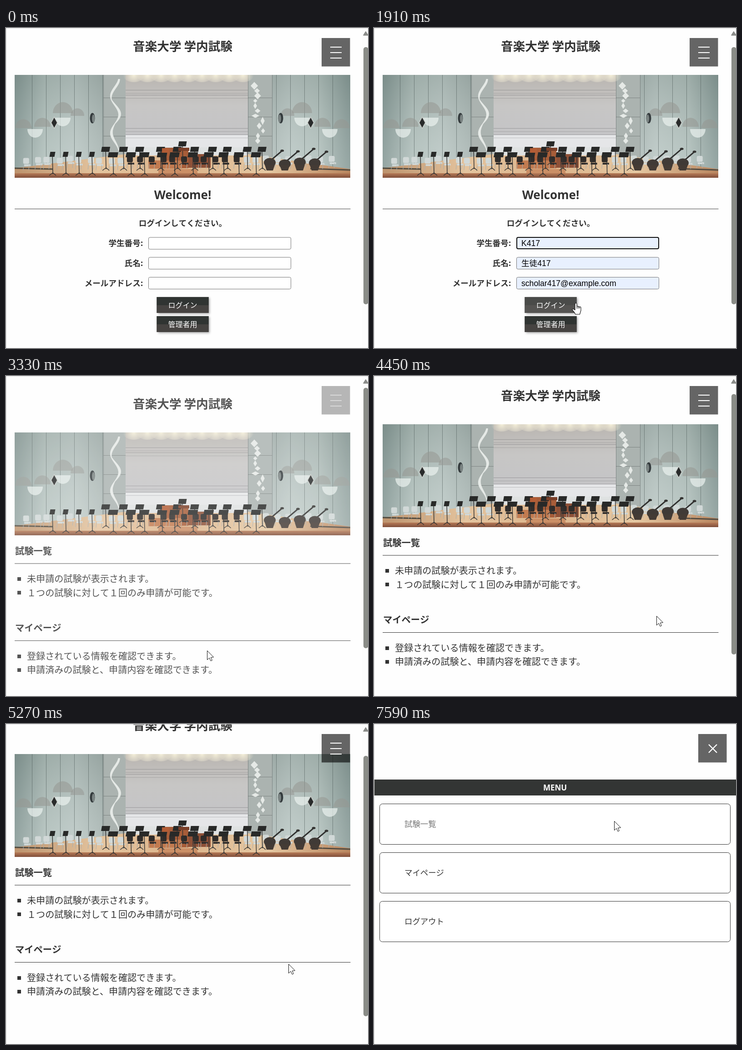
These frames come from a looping animation (796 px wide and 703 px high, 8000 ms). An HTML page with a canvas:

```html
<!DOCTYPE html>
<html lang="ja">
<head>
<meta charset="utf-8">
<title>音楽大学 学内試験</title>
<style>
html, body { margin: 0; width: 100%; height: 100%; overflow: hidden; background: #fefefe; }
canvas { display: block; }
</style>
</head>
<body>
<canvas id="stage" width="796" height="703"></canvas>
<script>
const W = 796, H = 703, LOOP = 8000, INK = '#333', PAPER = '#fefefe';
const CJK = '"Noto Sans CJK JP", "Noto Sans CJK", sans-serif';
const LATIN = '"Noto Sans", sans-serif';
const FIELD = '"Liberation Sans", "Noto Sans CJK JP", "Noto Sans CJK", sans-serif';
const stage = document.getElementById('stage').getContext('2d');
let g = stage;

// ---------- drawing helpers ----------
function rect(x, y, w, h, color) {
  g.fillStyle = color;
  g.fillRect(x, y, w, h);
}

function box(x, y, w, h, r, fill, stroke, line = 1) {
  g.beginPath();
  g.roundRect(x, y, w, h, r);
  if (fill) { g.fillStyle = fill; g.fill(); }
  if (stroke) { g.strokeStyle = stroke; g.lineWidth = line; g.stroke(); }
}

function poly(points, fill, stroke, line = 1) {
  g.beginPath();
  points.forEach(([x, y]) => g.lineTo(x, y));
  g.closePath();
  if (fill) { g.fillStyle = fill; g.fill(); }
  if (stroke) { g.strokeStyle = stroke; g.lineWidth = line; g.lineJoin = 'round'; g.stroke(); }
}

function strokeLine(x1, y1, x2, y2, color, width = 1) {
  g.beginPath();
  g.moveTo(x1, y1);
  g.lineTo(x2, y2);
  g.strokeStyle = color;
  g.lineWidth = width;
  g.stroke();
}

function ellipse(x, y, rx, ry, color, from = 0, to = Math.PI * 2) {
  g.beginPath();
  g.ellipse(x, y, rx, ry, 0, from, to);
  g.fillStyle = color;
  g.fill();
}

function diamond(x, y, rx, ry, fill) {
  poly([[x, y - ry], [x + rx, y], [x, y + ry], [x - rx, y]], fill);
}

// cy is the optical middle of the line
function text(str, x, cy, size, { weight = 400, color = INK, align = 'left', family = CJK } = {}) {
  g.font = `${weight} ${size}px ${family}`;
  g.textAlign = align;
  g.fillStyle = color;
  g.fillText(str, x, cy + size * 0.37);
}

function gradient(x1, y1, x2, y2, ...colors) {
  const fill = g.createLinearGradient(x1, y1, x2, y2);
  colors.forEach((c, i) => fill.addColorStop(i / (colors.length - 1), c));
  return fill;
}

// ---------- timing helpers ----------
const within = (t, start, end) => t >= start && t < end;
const smooth = k => k * k * (3 - 2 * k);

// 0 to 1 in evenly timed steps
function stepped(t, start, end, steps) {
  const k = Math.floor((t - start) / (end - start) * steps + 1e-6) / steps;
  return Math.min(1, Math.max(0, k));
}

function seeded(seed) {
  return () => (seed = seed * 16807 % 2147483647) / 2147483647;
}

// ---------- concert hall ----------
function makePhoto() {
  const canvas = document.createElement('canvas');
  canvas.width = 738;
  canvas.height = 226;
  g = canvas.getContext('2d');
  const random = seeded(29);
  drawWall(171);
  g.save();
  g.translate(738, 0);
  g.scale(-1, 1);
  drawWall(153);
  g.restore();
  drawScreen();
  drawOrnaments(random);
  drawFloor();
  drawOrchestra(random);
  g = stage;
  return canvas;
}

function drawFan(x, y, r) {
  ellipse(x, y, r, r * 1.1, 'rgba(150,152,147,.55)', Math.PI, Math.PI * 2);
}

function drawGlow(x, y) {
  ellipse(x, y, 17, 19, 'rgba(235,242,240,.7)', 0, Math.PI);
}

function drawWall(windowX) {
  rect(0, 0, 200, 226, gradient(0, 0, 200, 0, '#879a97', '#b3c2be', '#bdcac7', '#a9b6b3'));
  rect(0, 0, 200, 226, gradient(0, 0, 0, 226, 'rgba(70,85,80,.2)', 'rgba(255,255,255,.12)'));
  for (let x = 38; x < 195; x += 31) strokeLine(x + .5, 0, x + .5, 205, 'rgba(70,82,80,.55)');
  drawFan(19, 117, 18);
  drawFan(61, 114, 18);
  drawFan(106, 84, 22);
  drawFan(138, 90, 15);
  drawGlow(45, 119);
  drawGlow(106, 94);
  diamond(87, 105, 8, 14, '#c9cdc9');
  diamond(87, 105, 6, 11, '#292b2b');
  ellipse(windowX, 95, 5.5, 11.5, '#343b3d');
  ellipse(windowX + 2, 96, 3, 9, '#7b8483');
}

function drawScreen() {
  const seam = 'rgba(85,90,90,.5)';
  for (const [x, w] of [[195, 49], [513, 53]]) {
    rect(x, 0, w, 226, '#abb3b0');
    for (let y = 50; y < 150; y += 42) strokeLine(x, y + .5, x + w, y + .5, seam);
    strokeLine(x + .5, 0, x + .5, 180, seam);
    strokeLine(x + w + .5, 0, x + w + .5, 180, seam);
  }
  rect(244, 0, 269, 180, gradient(0, 0, 0, 135, '#b9b5b0', '#c7c6c5', '#c4c4c6'));
  rect(244, 132, 269, 30, '#e5e6e8');
  for (const top of [33, 44, 117, 131]) {
    strokeLine(244, top + .5, 513, top + .5, 'rgba(115,115,118,.5)');
    strokeLine(244, top + 7.5, 513, top + 7.5, 'rgba(115,115,118,.35)');
  }
  for (let x = 262; x < 510; x += 30) {
    const lamp = g.createRadialGradient(x, 0, 0, x, 0, 24);
    lamp.addColorStop(0, 'rgba(255,250,225,.85)');
    lamp.addColorStop(1, 'rgba(255,245,220,0)');
    ellipse(x, 0, 24, 16, lamp);
  }
}

function drawOrnaments(random) {
  const pale = '#e5e9e6';
  for (let y = 9; y < 168; y++) {
    const width = 2 + 4 * Math.abs(Math.sin(y / 17));
    rect(219 + 9 * Math.sin(y / 13 + 1.2), y, width, 1.5, pale);
  }
  for (let i = 0; i < 12; i++) {
    diamond(527 + random() * 20, 24 + i * 11, 4 + random() * 5, 4 + random() * 5, pale);
  }
}

function drawFloor() {
  poly([[0, 205], [244, 174], [513, 174], [738, 207], [738, 226], [0, 226]],
    gradient(0, 0, 738, 0, '#bd936d', '#e4c49e', '#dcb48b', '#e5c8a2', '#b9865f'));
  rect(244, 159, 269, 18, '#dfe2e2');
  rect(322, 160, 60, 45, '#a75d39');
  rect(382, 174, 49, 30, '#8e5138');
  rect(294, 188, 74, 18, '#c27b50');
  strokeLine(0, 205, 84, 207, '#514b40', 3);
  strokeLine(650, 206, 738, 209, '#544d43', 3);
  rect(0, 216, 738, 10, gradient(0, 216, 0, 226, '#b67b57', '#7f4e3a'));
  rect(316, 207, 86, 9, '#cb8f66');
}

function drawChair(x, y, color) {
  box(x, y, 13, 13, 3, color);
  rect(x + 2, y + 14, 14, 4, color);
  strokeLine(x + 1, y + 16, x, y + 27, '#a9aeae');
  strokeLine(x + 13, y + 16, x + 12, y + 27, '#a9aeae');
}

function drawStand(x, y, w) {
  strokeLine(x, y, x + 1, y + 44, '#343433', 1.5);
  strokeLine(x - 7, y + 47, x + 1, y + 41, '#343433', 1.5);
  strokeLine(x + 8, y + 47, x + 1, y + 41, '#343433', 1.5);
  poly([[x - w / 2 + 2, y - 5], [x + w / 2, y - 5], [x + w / 2 - 2, y + 6], [x - w / 2, y + 6]], '#282928');
}

function drawCello(x, y, size) {
  const tipX = x + size, tipY = y - size * .85;
  strokeLine(x, y, tipX, tipY, '#30302f', 3);
  ellipse(tipX, tipY, 4, 2.5, '#343331');
  ellipse(x, y + 3, 13, 10, '#403a36');
  poly([[x - 11, 198], [x + 11, 198], [x + 7, 210], [x - 7, 210]], '#443b35');
}

function drawOrchestra(random) {
  const jitter = amount => (random() - .5) * amount;
  for (let x = 20; x < 690; x += 23) {
    if (x < 250 || x > 480) drawChair(x + jitter(8), 180 + jitter(6), '#d1d8d7');
    else drawChair(x + jitter(8), 179, '#302c2a');
  }
  drawStand(369, 151, 19);
  for (let i = 0; i < 10; i++) drawStand(202 + i * 38.3 + jitter(8), 163, 20);
  for (let i = 0; i < 10; i++) drawStand(216 + i * 35 + jitter(10), 175, 23);
  for (let i = 0; i < 4; i++) drawStand(83 + i * 29, 174, 13);
  rect(324, 161, 15, 10, '#b35d36');
  rect(360, 160, 24, 7, '#7a3f29');
  for (let i = 0; i < 4; i++) drawCello(561 + i * 33, 189 + jitter(8), 29 + jitter(8));
}

const photo = makePhoto();

// ---------- page parts ----------
function drawHeader(top) {
  text('音楽大学 学内試験', 388.5, top + 61, 26.6, { weight: 700, align: 'center' });
  g.drawImage(photo, 19, top + 124);
}

function drawMenuButton(x, open) {
  rect(x, 22, 62.5, 62.5, 'rgba(0,0,0,.6)');
  if (open) {
    strokeLine(x + 23, 45, x + 41, 63, '#fff', 2.4);
    strokeLine(x + 41, 45, x + 23, 63, '#fff', 2.4);
  } else {
    for (let y = 41; y <= 65; y += 12) rect(x + 19, y, 25, 2, '#fff');
  }
}

function drawScrollbar(scroll, length) {
  rect(783, 1, 13, H, '#fcfcfc');
  poly([[791, 8], [796, 16], [786, 16]], '#8a8c89', '#8a8c89', 1.5);
  box(786, 26 + scroll * .76, 10.5, length, 5, '#8a8c87');
}

function drawField(y, value, focused) {
  const fill = value ? '#e8f0fe' : '#fff';
  if (focused) box(314, y, 312, 25, 3, fill, '#101010', 2);
  else box(313.5, y, 313, 26, 3, fill, '#767676');
  text(value, 324, y + 12.5, 17.6, { color: '#000', family: FIELD });
}

function drawButton(y, label, hover) {
  g.save();
  g.shadowColor = 'rgba(0,0,0,.35)';
  g.shadowBlur = 5;
  g.shadowOffsetX = g.shadowOffsetY = 2;
  rect(331.5, y, 114, 35, INK);
  g.restore();
  rect(331.5, y, 114, 18, hover ? '#4a4b49' : '#303432');
  rect(331.5, y + 18, 114, 17, hover ? '#555452' : '#464341');
  text(label, 388.5, y + 18.5, 16, { weight: 500, color: '#fff', align: 'center' });
}

function drawLogin(t) {
  const bold = { weight: 700, align: 'center' };
  const filled = t >= 390;
  const focused = within(t, 390, 2010);
  const caretOn = Math.floor((t - 410) / 500) % 2 === 0;
  const rows = [['学生番号:', 'K417'], ['氏名:', '生徒417'], ['メールアドレス:', 'scholar417@example.com']];

  drawHeader(-21);
  text('Welcome!', 388.5, 366.5, 26, { ...bold, family: LATIN });
  rect(19, 397, 738.5, 1, '#444');
  text('ログインしてください。', 388.5, 428, 17.6, bold);
  rows.forEach(([label, value], i) => {
    const y = 460 + i * 43.75;
    text(label, 301.5, y + 12.5, 17.6, { weight: 700, align: 'right' });
    drawField(y, filled ? value : '', focused && i === 0);
  });
  if (focused && caretOn) rect(365, 463, 1, 19, '#000');
  drawButton(591, 'ログイン', within(t, 1210, 2530));
  drawButton(633, '管理者用', false);
  drawMenuButton(694, false);
  drawScrollbar(21, 565);
}

function drawSection(y, title, lines) {
  text(title, 20, y, 20.3, { weight: 700 });
  rect(19, y + 27.5, 738.5, 1, INK);
  lines.forEach((line, i) => {
    const cy = y + 62 + i * 30.2;
    rect(25, Math.round(cy - 4), 8, 8, INK);
    text(line, 46, cy, 20.1);
  });
}

function drawHome(t) {
  const down = stepped(t, 4350, 4650, 3), up = stepped(t, 5170, 5370, 2);
  const scroll = Math.round(128 * down ** 1.8 * (1 - up) ** 1.14);
  const shown = t >= 3330;
  g.globalAlpha = shown ? .83 + .17 * stepped(t, 3330, 3530, 2) : 0;
  drawHeader(-scroll);
  drawSection(384 - scroll, '試験一覧',
    ['未申請の試験が表示されます。', '１つの試験に対して１回のみ申請が可能です。']);
  drawSection(553.5 - scroll, 'マイページ',
    ['登録されている情報を確認できます。', '申請済みの試験と、申請内容を確認できます。']);
  if (t < 6490) {
    g.globalAlpha = shown ? .48 + .52 * stepped(t, 3330, 3630, 3) : 0;
    drawMenuButton(694, false);
    g.globalAlpha = 1;
    drawScrollbar(scroll, 572);
  }
  g.globalAlpha = 1;
}

function drawMenu(t) {
  g.globalAlpha = stepped(t, 6390, 6790, 4);
  rect(0, 0, W, H, PAPER);
  rect(1, 122, 795, 35, '#333534');
  text('MENU', 398, 139.8, 17, { weight: 700, color: '#fff', align: 'center', family: LATIN });
  ['試験一覧', 'マイページ', 'ログアウト'].forEach((label, i) => {
    const y = 175.5 + i * 107;
    const hover = i === 0 && t >= 6990;
    box(12.5, y, 771, 89, 6, '#fff', INK);
    text(label, 67, y + 44.5, 17.4, { color: hover ? '#777' : INK });
  });
  g.globalAlpha = 1;
  drawMenuButton(713, true);
}

// ---------- pointer ----------
const TRIPS = [
  { to: [445, 603], start: 390, end: 1110 },
  { to: [442, 603], start: 1110, end: 1210 },
  { to: [621, 527], start: 3330, end: 3950 },
  { to: [712, 51], start: 5470, end: 6270 },
  { to: [528, 213], start: 6490, end: 7090 },
];
const CLICKS = [[2010, 2110], [6370, 6490], [7390, 7590]];

function pointerAt(t) {
  return TRIPS.reduce(([x, y], { to, start, end }) => {
    const k = smooth(stepped(t, start, end, Math.round((end - start) / 100)));
    return [x + (to[0] - x) * k, y + (to[1] - y) * k];
  }, [737, 109]);
}

function drawArrow(x, y) {
  poly([[0, 0], [0, 20], [4.6, 15.8], [7.8, 22.5], [10.8, 21], [7.8, 14.8], [14, 14.2]]
    .map(([px, py]) => [x + .5 + px, y + .5 + py]), '#fff', '#111');
}

function drawHand(x, y) {
  g.save();
  g.translate(x, y);
  g.beginPath();
  g.moveTo(0, 15);
  g.lineTo(0, 2.5);
  g.quadraticCurveTo(2, -1, 4, 2.5);
  g.lineTo(4, 8);
  for (let k = 4; k <= 10; k += 3) g.quadraticCurveTo(k + 2, 6 + k * .1, k + 3, 9.5 + (k - 4) * .2);
  g.lineTo(13, 17);
  g.quadraticCurveTo(12, 20, 10.5, 25.5);
  g.lineTo(1, 25.5);
  g.quadraticCurveTo(-1, 21, -6, 16);
  g.quadraticCurveTo(-6, 11.5, 0, 16);
  g.closePath();
  g.fillStyle = '#fff';
  g.fill();
  g.strokeStyle = '#111';
  g.lineWidth = 1.1;
  g.stroke();
  for (let k = 4; k <= 10; k += 3) strokeLine(k, 8.5, k, 13, '#111');
  g.restore();
}

function drawPointer(t) {
  if (t < 390) return;
  const [x, y] = pointerAt(t);
  if (CLICKS.some(([start, end]) => within(t, start, end))) {
    ellipse(x - .5, y, 15.5, 15.5, 'rgba(208,204,20,.7)');
  }
  if (within(t, 1210, 2530)) drawHand(x, y + .5);
  else drawArrow(x, y);
}

function render(t) {
  rect(0, 0, W, H, PAPER);
  if (t < 3030) drawLogin(t);
  else drawHome(t);
  if (t >= 6490) drawMenu(t);
  drawPointer(t);
  rect(0, 0, W, 1, '#e2e2e2');
  rect(0, 0, 1, H, '#e2e2e2');
}

const begun = performance.now();
function tick() {
  render((performance.now() - begun) % LOOP);
  requestAnimationFrame(tick);
}
tick();
</script>
</body>
</html>
```
